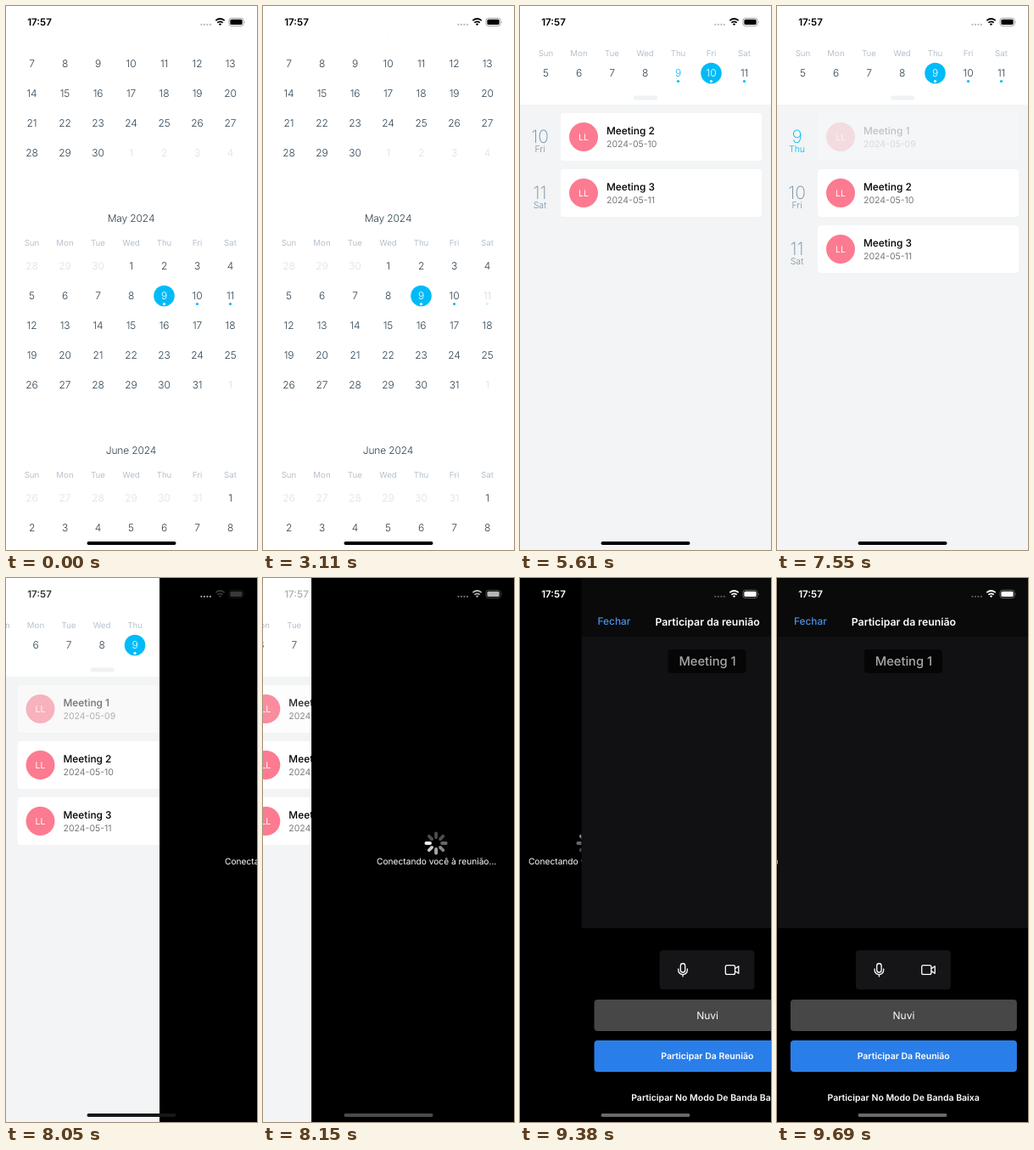
These frames come from a looping animation (296x640 px, 9.73 s). An HTML page:

```html
<!DOCTYPE html>
<html lang="pt">
<head>
<meta charset="utf-8">
<title>Agenda</title>
<style>
  html, body { margin: 0; width: 100%; height: 100%; overflow: hidden; background: #fff; }
  svg { display: block; width: 296px; height: 640px; }
  text { font-family: Inter, Roboto, "Liberation Sans", sans-serif; text-rendering: geometricPrecision; }
  .mid { text-anchor: middle; }
  .num { font-size: 12px; font-weight: 300; letter-spacing: -.15px; }
  .week { font-size: 9.7px; fill: #b6c1cd; }
</style>
</head>
<body>
<svg id="stage" viewBox="0 0 296 640" xmlns="http://www.w3.org/2000/svg"></svg>
<script>
const LOOP = 9730, W = 296, H = 640;
const BLUE = '#00bbf7', INK = '#2d4150', FAINT = '#d9e1e8', GREY = '#f2f4f5';
const TOP = 37, ROW = 35;

// Moments at which the screen refreshes; the pose holds in between.
const TICKS = [
  0, 3110, 3730, 3840, 3950, 5050, 5400, 5500, 5610, 6310, 6690, 6790, 6900, 7550,
  8050, 8150, 8270, 8380, 8490, 8610, 8730, 8840, 8960,
  9060, 9170, 9270, 9380, 9490, 9590, 9690
];
const TAPS = [
  { day: 11, down: 3110, up: 3730 },
  { day: 10, down: 5400, up: 5400 },
  { day: 9, down: 6310, up: 6690 }
];

const stage = document.getElementById('stage');
const clamp = v => Math.max(0, Math.min(1, v));
const smooth = u => u * u * (3 - 2 * u);
const colX = c => 30.5 + 39 * c;

function add(parent, tag, attrs = {}, text) {
  const node = document.createElementNS('http://www.w3.org/2000/svg', tag);
  set(node, attrs);
  if (text !== undefined) node.textContent = text;
  parent.appendChild(node);
  return node;
}
function set(node, attrs) {
  for (const k in attrs) node.setAttribute(k, attrs[k]);
}
const group = (parent, attrs) => add(parent, 'g', attrs);
const rect = (parent, x, y, width, height, fill, rx = 0) =>
  add(parent, 'rect', { x, y, width, height, fill, rx });
const label = (parent, x, y, text, size, fill, weight = 400, cls = 'mid') =>
  add(parent, 'text', { x, y, class: cls, 'font-size': size, fill, 'font-weight': weight }, text);
const move = (node, x, y = 0) => node.setAttribute('transform', `translate(${x} ${y})`);
const show = (node, on) => node.setAttribute('display', on ? 'inline' : 'none');

function weekdays(parent, y) {
  ['Sun', 'Mon', 'Tue', 'Wed', 'Thu', 'Fri', 'Sat'].forEach((name, c) =>
    add(parent, 'text', { x: colX(c), y: y + 3.5, class: 'mid week' }, name));
}

// Agenda screen
const home = group(stage);
rect(home, 0, 0, W, H, GREY);

const list = group(home);
const cards = [9, 10, 11].map((day, i) => {
  const g = group(list);
  const tint = day === 9 ? BLUE : '#7a92a5';
  label(g, 23.5, 34.5, day, 21, tint, 200);
  label(g, 23.5, 46, ['Thu', 'Fri', 'Sat'][i], 10.6, tint, 300);
  const card = group(g);
  rect(card, 48, 0, 237, 56, '#fff', 4);
  add(card, 'circle', { cx: 75, cy: 28, r: 17, fill: '#fc7b90' });
  label(card, 75, 32, 'LL', 10.5, '#fff');
  label(card, 102, 25.2, 'Meeting ' + (i + 1), 11.9, '#000', 500, '');
  label(card, 102, 40.2, '2024-05-' + String(day).padStart(2, '0'), 10.5, '#777', 400, '');
  return { day, g, card };
});

const panel = rect(home, 0, 0, W, H, '#fff');
const clip = add(add(home, 'clipPath', { id: 'sheet' }), 'rect', { x: 0, y: TOP, width: W, height: H });
const months = group(group(home, { 'clip-path': 'url(#sheet)' }));
const marked = [];

function addMonth(month, name, top) {
  add(months, 'text', { x: 147.5, y: top + 4.3, class: 'mid num' }, name + ' 2024').setAttribute('fill', INK);
  weekdays(months, top + 28);
  const lead = new Date(2024, month, 1).getDay();
  for (let i = 0; i < 35; i++) {
    const date = new Date(2024, month, 1 - lead + i);
    const day = date.getDate(), inside = date.getMonth() === month;
    const x = colX(i % 7), y = top + 56 + ROW * Math.floor(i / 7);
    const g = group(months);
    const special = month === 4 && inside && day >= 9 && day <= 11;
    const disc = special && add(g, 'circle', { cx: x, cy: y, r: 12.3, fill: BLUE });
    const text = add(g, 'text', { x, y: y + 4.3, class: 'mid num', fill: inside ? INK : FAINT }, day);
    if (special) {
      const dot = add(g, 'circle', { cx: x, cy: y + 9.5, r: 1.6 });
      marked.push({ day, g, disc, text, dot });
    }
  }
}
addMonth(3, 'April', -23);
addMonth(4, 'May', 250);
addMonth(5, 'June', 523);

const handle = group(home);
rect(handle, 0, -18, W, 18, '#fff');
rect(handle, 134, -10.5, 28, 5, '#f0f1f2', 2.5);
const pinned = group(home);
rect(pinned, 0, TOP, W, 29, '#fff');
weekdays(pinned, 55);

// Connecting screen
const wait = group(stage);
rect(wait, 0, 0, W, H, '#000');
const petals = Array.from({ length: 8 }, (_, i) => add(wait, 'line', {
  x1: 0, y1: -7, x2: 0, y2: -11.7, stroke: '#fff', 'stroke-width': 3.8, 'stroke-linecap': 'round',
  transform: `translate(147 312) rotate(${45 * i})`
}));
label(wait, 147.6, 337, 'Conectando você à reunião...', 10.2, '#fff');

// Join screen
const join = group(stage);
rect(join, 0, 0, W, H, '#000');
rect(join, 0, 0, W, 69, '#0a0a0b');
rect(join, 0, 69, W, 343, '#111113');
label(join, 19, 55.3, 'Fechar', 11.9, '#4a8fe8', 500, '');
label(join, 148.5, 56.3, 'Participar da reunião', 12.3, '#fff', 600);
rect(join, 102, 84, 92, 28, '#060607', 4);
label(join, 148.5, 103.4, 'Meeting 1', 14.7, '#a9a9ab', 500);
rect(join, 92, 438, 112, 46, '#151517', 4);
const icons = group(join, {
  fill: 'none', stroke: '#fff', 'stroke-width': 1.3, 'stroke-linecap': 'round', 'stroke-linejoin': 'round'
});
add(icons, 'rect', { x: 116.8, y: 453.5, width: 5.4, height: 10.5, rx: 2.7 });
add(icons, 'path', { d: 'M114.2 460v1.3a5.3 5.3 0 0 0 10.6 0V460M119.5 466.6v2.2' });
add(icons, 'rect', { x: 169.8, y: 455.6, width: 11.2, height: 10.8, rx: 2 });
add(icons, 'path', { d: 'M181 459.6l4.3-2.8v8.4l-4.3-2.8' });
rect(join, 15, 496, 267, 37, '#474747', 4);
label(join, 148.5, 519.3, 'Nuvi', 12, '#fff');
rect(join, 15, 544, 267, 37, '#2a7ee9', 4);
label(join, 148.3, 566.4, 'Participar Da Reunião', 10.5, '#fff', 600);
label(join, 148.3, 614.8, 'Participar No Modo De Banda Baixa', 10.5, '#fff', 600);

// Status bar and home indicator
const status = group(stage);
const INHERIT = 'currentColor';
label(status, 39.5, 23, '17:57', 11.6, INHERIT, 600);
const signal = group(status);
for (let i = 0; i < 4; i++) add(signal, 'circle', { cx: 230.4 + 3.5 * i, cy: 21.8, r: 1.15 });
add(status, 'path', {
  d: 'M247.3 17.2Q252.5 12.8 257.7 17.2M249.3 19.6Q252.5 17 255.7 19.6',
  fill: 'none', stroke: INHERIT, 'stroke-width': 1.7
});
add(status, 'path', { d: 'M250.8 21.3Q252.5 19.9 254.2 21.3L252.5 23.1z', fill: INHERIT });
set(rect(status, 263, 14.3, 17, 9.2, 'none', 2.8), { stroke: INHERIT, 'stroke-opacity': .4, 'stroke-width': .9 });
rect(status, 264.4, 15.7, 14.2, 6.4, INHERIT, 1.6);
add(status, 'path', { d: 'M281.2 17.4q1.4 1.5 0 3z', fill: INHERIT, opacity: .45 });
const bar = rect(stage, 95.5, 630, 105, 4, '#000', 2);

const shade = v => { const n = Math.round(v); return `rgb(${n},${n},${n})`; };

// Critically damped slide of a pushed screen
function slide(t, start) {
  const w = Math.max(0, t - start) * .017;
  return 1 - (1 + w) * Math.exp(-w);
}

function dayOpacity(day, t) {
  const tap = TAPS.find(a => a.day === day);
  if (t < tap.down) return 1;
  return .2 + .8 * clamp((t - tap.up) / 210);
}

function drawAgenda(t) {
  const fold = smooth(clamp((t - 3690) / 340));
  const bottom = H - 524 * fold;
  panel.setAttribute('height', bottom);
  clip.setAttribute('height', bottom - TOP);
  move(months, 0, -262 * fold);
  move(handle, 0, bottom);
  show(handle, fold > 0);
  show(pinned, fold === 1);

  const picked = TAPS.reduce((day, tap) => t >= tap.up ? tap.day : day, 9);
  for (const m of marked) {
    const on = m.day === picked;
    show(m.disc, on);
    m.text.setAttribute('fill', on ? '#fff' : m.day === 9 ? BLUE : INK);
    m.dot.setAttribute('fill', on ? '#fff' : BLUE);
    m.g.setAttribute('opacity', dayOpacity(m.day, t));
  }

  show(list, fold === 1);
  for (const c of cards) {
    show(c.g, c.day >= picked);
    move(c.g, 0, 126 + 66 * (c.day - picked));
  }
  const pressed = t >= 7550 ? .2 + .8 * clamp((t - 7945) / 250) : 1;
  cards[0].card.setAttribute('opacity', pressed);
}

function draw(time) {
  const t = TICKS.filter(k => k <= time).pop();
  drawAgenda(t);

  const first = slide(t, 7971), second = slide(t, 9220);
  move(home, -.3 * W * first);
  move(wait, W * (1 - first) - .3 * W * second);
  move(join, W * (1 - second));
  show(wait, first > 0);
  show(join, second > 0);

  const lead = Math.floor((t - 8150) / 100) + 6;
  petals.forEach((p, i) => {
    const behind = (((lead - i) % 8) + 8) % 8;
    p.setAttribute('opacity', Math.max(.3, .92 - .13 * behind));
  });

  const dark = Math.pow(first, 1.6);
  status.style.color = shade(255 * dark);
  signal.setAttribute('fill', shade(185 - 95 * dark));
  bar.setAttribute('fill', shade(106 * dark));
}

const begin = performance.now();
function frame() {
  draw((performance.now() - begin) % LOOP);
  requestAnimationFrame(frame);
}
frame();
</script>
</body>
</html>
```
